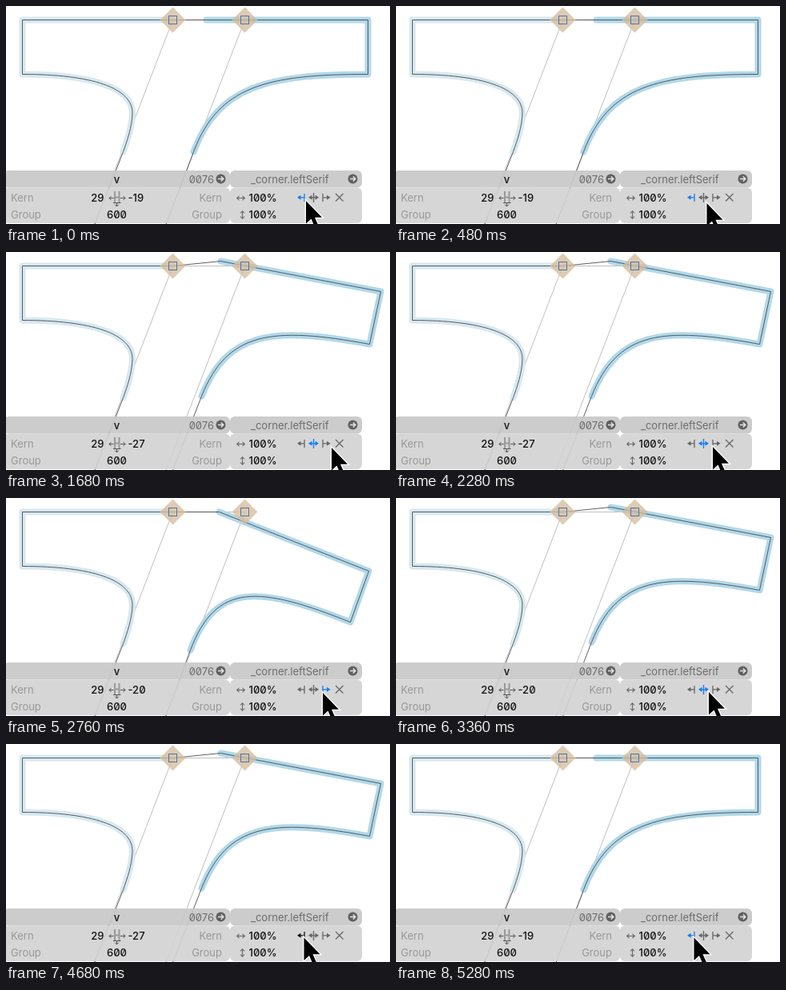
An HTML page for the animation above (5400 ms loop, 480 by 273 pixels).

```html
<!DOCTYPE html>
<html lang="en">
<head>
<meta charset="utf-8">
<title>Corner alignment</title>
<style>
  html, body { margin: 0; width: 100%; height: 100%; overflow: hidden; background: #fff; }
  svg { display: block; width: 100vw; height: 100vh; }
  text { font: 13px Inter, sans-serif; font-feature-settings: "zero"; fill: #989898; }
  .dark { fill: #111; font-weight: 500; }
  .head { fill: #6c6c6c; }
  .mid { text-anchor: middle; }
  .end { text-anchor: end; }
  .line { fill: none; stroke: #444; stroke-width: .85; }
  .guide { fill: none; stroke: #b4b4b4; stroke-width: .85; }
  .glow { fill: none; stroke-width: 8; stroke-linecap: round; stroke-linejoin: round; }
  .icon { fill: none; stroke: currentColor; stroke-width: 1.3; color: #666; }
  .tip { fill: currentColor; stroke: none; }
</style>
</head>
<body>
<svg viewBox="0 0 480 273">
  <defs>
    <g id="node">
      <path d="M0-16 16 0 0 16-16 0Z" fill="#d6bd9d" fill-opacity=".78"/>
      <rect x="-5" y="-5" width="10" height="10" fill="none" stroke="#4676b4"/>
    </g>
    <g id="go">
      <circle r="6" fill="#606060"/>
      <path d="M-3.5 0H3M.3-3 3.3 0 .3 3" fill="none" stroke="#e4e4e4" stroke-width="1.5"/>
    </g>
    <path id="spread" d="M-4.5 0H4.5M-2-2.6-4.8 0-2 2.6M2-2.6 4.8 0 2 2.6" fill="none" stroke="#666" stroke-width="1.1"/>
  </defs>

  <g transform="translate(.5 .5)">
    <path class="guide" d="M208 17H298M208 17 109.5 273M298 17 199.5 273"/>
    <path class="glow" stroke="#d7e8f0" d="M208 17H20V85C107 85 158 102 157.500 134C157 151 151 168 146 182"/>
    <path class="line" d="M208 17H20V85C107 85 158 102 157.500 134C157 151 151 168 146 182L110.500 273"/>
    <path id="glow" class="glow" stroke="#b1d8e9"/>
    <path id="outline" class="line"/>
    <use href="#node" x="208" y="17"/>
    <use href="#node" x="298" y="17"/>
  </g>

  <g opacity=".93">
    <rect x="-3" y="206" width="283" height="21.500" rx="6" fill="#c9c9c9"/>
    <rect x="-3" y="227.500" width="283" height="44.500" rx="6" fill="#d3d3d3"/>
    <rect x="280" y="206" width="165" height="21.500" rx="6" fill="#c9c9c9"/>
    <rect x="280" y="227.500" width="165" height="44.500" rx="6" fill="#d3d3d3"/>
  </g>

  <text class="dark mid" x="138.5" y="221.5">v</text>
  <text class="head end" x="260" y="221.5">0076</text>
  <text class="head" x="306" y="221.5">_corner.leftSerif</text>
  <use href="#go" x="268.5" y="216.5"/>
  <use href="#go" x="433.5" y="216.5"/>

  <text x="6" y="245">Kern</text>
  <text x="6" y="266">Group</text>
  <text class="end" x="270" y="245">Kern</text>
  <text class="end" x="270" y="266">Group</text>
  <text class="dark end" x="122.5" y="245">29</text>
  <text id="kern" class="dark" x="152.5" y="245"></text>
  <text class="dark mid" x="138.5" y="266">600</text>
  <text class="dark" x="303.5" y="245">100%</text>
  <text class="dark" x="303.5" y="266">100%</text>

  <path d="M136 232V246M141.500 232V246M136 239.500H141.500" stroke="#999" stroke-width="2"/>
  <path d="M129 240.500H134.500M143 240.500H149M131.500 238 129 240.500 131.500 243M146.500 238 149 240.500 146.500 243M134 246.500H143.500M138.500 246.500V251M136 248.500 138.500 251 141 248.500" fill="none" stroke="#555"/>
  <use href="#spread" x="293.5" y="240.5"/>
  <use href="#spread" transform="translate(295.5 261.5) rotate(90)"/>

  <g class="icon" data-side="left">
    <path d="M373 235V245M368 239.800H373"/>
    <path class="tip" d="M364 239.800 368.500 236.800V242.800Z"/>
  </g>
  <g class="icon" data-side="center">
    <path d="M384.500 234V246M381 239.800H388"/>
    <path class="tip" d="M378 239.800 382.500 236.800V242.800ZM391 239.800 386.500 236.800V242.800Z"/>
  </g>
  <g class="icon" data-side="right">
    <path d="M396 235V245M396 239.800H401"/>
    <path class="tip" d="M405.500 239.800 401 236.800V242.800Z"/>
  </g>
  <path class="icon" d="M412 235 421.500 244.500M421.500 235 412 244.500"/>

  <path id="cursor" d="M0 0V28.500L6.500 22.500 10.800 32.500 15.300 30.500 11 20.800H20Z" stroke="#fff" stroke-width="2.600" paint-order="stroke"/>
</svg>
<script>
const LOOP = 5400, STEP = 120;
const $ = id => document.getElementById(id);

// start of the serif, its edge with curve, and where the stem leaves the view
const poses = {
  left: ['250 17', 'L452 17V85C325 85 265 100 234 182', '199.5 273'],
  center: ['268 11', 'L468 49 454 115C330 92 276 100 244 180', '208 273'],
  right: ['266 17', 'L453 91 430 155C315 109 262 105 230 190', '199 273']
};
const poseKeys = [[0, 'left'], [840, 'center'], [2520, 'right'], [3360, 'center'], [4800, 'left']];
const kernKeys = [[0, -19], [960, -27], [2640, -20], [3480, -27], [4920, -19]];
const presses = [[600, 840, 'center'], [2400, 2520, 'right'], [3240, 3360, 'center'], [4560, 4800, 'left']];
const path = [
  [0, 375, 244], [480, 388.5, 247], [1200, 388.5, 247], [1560, 407, 245], [1800, 407, 245],
  [2280, 396, 244], [2880, 396, 244], [3240, 391, 243], [3840, 391, 243],
  [4320, 372.5, 242.5], [LOOP, 372.5, 242.5]
];

const hold = (keys, t) => keys.findLast(k => k[0] <= t)[1];

function cursorAt(t) {
  const i = path.findIndex(k => k[0] > t);
  const [t0, x0, y0] = path[i - 1], [t1, x1, y1] = path[i];
  const u = (t - t0) / (t1 - t0), e = u * u * (3 - 2 * u);
  return [x0 + (x1 - x0) * e, y0 + (y1 - y0) * e];
}

function draw(t) {
  const side = hold(poseKeys, t);
  const [start, edge, foot] = poses[side];
  $('glow').setAttribute('d', `M${start}${edge}`);
  $('outline').setAttribute('d', `M208 17L${start}${edge}L${foot}`);
  $('kern').textContent = hold(kernKeys, t);

  // a pressed button turns black and the current choice loses its blue
  const pressed = presses.find(([from, to]) => t >= from && t < to)?.[2];
  for (const icon of document.querySelectorAll('[data-side]')) {
    const active = icon.dataset.side === (pressed ?? side);
    icon.style.color = !active ? '#666' : pressed ? '#111' : '#147cf0';
  }
  $('cursor').setAttribute('transform', `translate(${cursorAt(t)})`);
}

function tick() {
  const t = performance.now() % LOOP;
  draw(Math.floor(t / STEP) * STEP);
  requestAnimationFrame(tick);
}
tick();
</script>
</body>
</html>
```
